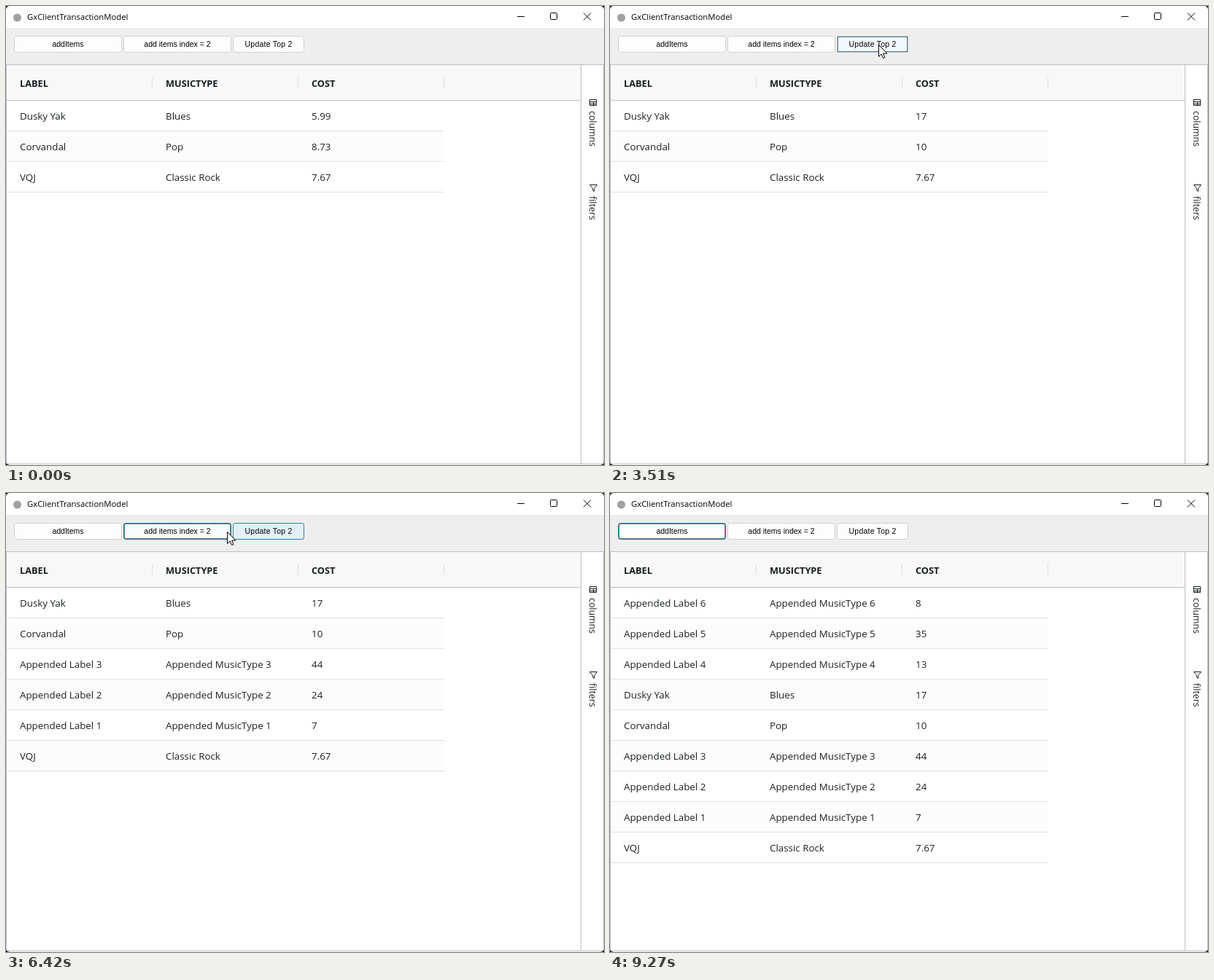
An HTML page that plays this animation: 820x630 px, repeating every 9350 ms.

```html
<!DOCTYPE html>
<html lang="en">
<head>
<meta charset="utf-8">
<title>GxClientTransactionModel</title>
<style>
  html, body { margin: 0; width: 100%; height: 100%; overflow: hidden; background: #18121c; }
  svg { display: block; }
  text { font: 13.35px "Open Sans", "Noto Sans", sans-serif; fill: #1c2123; white-space: pre; }
  .title { font-size: 11.3px; fill: #000; }
  .head text { font-size: 12.75px; font-weight: 700; fill: #181d1f; }
  .side text { font-size: 12.35px; fill: #181d1f; }
  .button text { font: 10.5px "Liberation Sans", Arial, sans-serif; fill: #000; text-anchor: middle; }
  .button rect { fill: #fdfdfd; stroke: #d0d0d0; }
  .button .ring { fill: none; stroke: #0b7a9c; }
  .button .hover { fill: #e0eef8; stroke: #0b7a9c; }
  .button .press { fill: #f4f9fd; stroke: #a9cbdc; }
  .button .dots { fill: none; stroke: #000; stroke-dasharray: 1 1; }
  .line { fill: #babfc7; }
  .icon { fill: none; stroke: #181d1f; }
</style>
</head>
<body>
<svg width="820" height="630" viewBox="0 0 820 630">
  <rect width="820" height="630" rx="5" fill="#fff"/>
  <rect y="30" width="820" height="51" fill="#eee"/>

  <circle cx="15.5" cy="16" r="5.5" fill="#a0a0a0"/>
  <text class="title" x="29" y="19">GxClientTransactionModel</text>
  <g fill="none" stroke="#000">
    <path d="M701 14.5h10M792 9.5l10 10M802 9.5l-10 10"/>
    <rect x="746.5" y="9.5" width="9" height="9" rx="1"/>
  </g>

  <g id="buttons"></g>

  <rect x="1" y="81" width="787" height="48" fill="#f8f8f8"/>
  <g class="head">
    <text x="19" y="110.5">LABEL</text>
    <text x="219" y="110.5">MUSICTYPE</text>
    <text x="419" y="110.5">COST</text>
  </g>
  <path d="M200.5 98v14M400.5 98v14M600.5 98v14" stroke="#d9dce0"/>
  <g id="rows"></g>

  <g class="line">
    <rect y="80" width="820" height="1"/>
    <rect y="129" width="788" height="1"/>
    <rect x="788" y="81" width="1" height="547"/>
    <rect y="80" width="1" height="546"/>
    <rect x="819" y="80" width="1" height="546"/>
    <rect x="2" y="628" width="816" height="1"/>
  </g>

  <g class="side">
    <path class="icon" d="M800.5 128.5h9v8h-9zM800 131.5h10M805.5 131v6M800 134.5h10"/>
    <text transform="translate(800 144) rotate(90)">columns</text>
    <path class="icon" d="M800.5 245.5h10l-4 5v4l-2-1.500v-2.500z"/>
    <text transform="translate(800 261) rotate(90)">filters</text>
  </g>

  <path id="cursor" d="M.5.5v16l3.700-3.500 2.500 5.600 2.300-1-2.400-5.500h5.300z" fill="#fff" stroke="#000"/>
</svg>
<script>
const LOOP = 9350, FADE = 170;
const $ = id => document.getElementById(id);
const clamp = v => Math.min(1, Math.max(0, v));

// Each span is [start, end]; it fades in after start and out after end.
const buttons = [
  { label: "addItems", x: 11, width: 148,
    hover: [[4340, 4760], [6620, 8470]], press: [[6950, 7190]], focus: [6950, LOOP] },
  { label: "add items index = 2", x: 161, width: 148,
    hover: [[2740, 2960], [4050, 4300], [4860, 6130], [6410, 6600]],
    press: [[5030, 5330]], focus: [5030, 6950] },
  { label: "Update Top 2", x: 311, width: 98, spacing: .22,
    hover: [[700, 2740], [2970, 4030], [6270, 6400]],
    press: [[1700, 1920], [3200, 3500]], focus: [1700, 5030] },
];

const path = [
  [80, 440, 640], [870, 377, 47], [2660, 377, 47], [2870, 295, 52], [3090, 368, 53],
  [3900, 368, 53], [4510, 97, 52], [4680, 97, 52], [5000, 197, 56], [6020, 197, 56],
  [6320, 330, 54], [6790, 99, 48], [8430, 99, 48], [8820, 438, 605], [9120, 438, 605],
  [9270, 440, 640],
];

const appended = (n, cost) => [`Appended Label ${n}`, `Appended MusicType ${n}`, cost];
const base = (top, second) => [["Dusky Yak", "Blues", top], ["Corvandal", "Pop", second]];
const last = ["VQJ", "Classic Rock", "7.67"];
const inserted = [...base(17, 10), appended(3, 44), appended(2, 24), appended(1, 7), last];
const tables = [
  [0, [...base("5.99", "8.73"), last]],
  [1950, [...base(20, 38), last]],
  [3440, [...base(17, 10), last]],
  [5310, inserted],
  [7230, [appended(6, 8), appended(5, 35), appended(4, 13), ...inserted]],
];

$("buttons").innerHTML = buttons.map(({ label, x, width, spacing = 0 }) => {
  const box = name => `<rect class="${name}" x=".5" y=".5" width="${width - 1}" height="22" rx="3"/>`;
  return `<g class="button" transform="translate(${x} 41)">
    ${["base", "ring", "hover", "press"].map(box).join("")}
    <rect class="dots" x="1.5" y="1.5" width="${width - 3}" height="20"/>
    <text x="${width / 2}" y="15" letter-spacing="${spacing}">${label}</text></g>`;
}).join("");
buttons.forEach((button, i) => { button.node = $("buttons").children[i]; });

const fade = (t, [start, end], out = FADE) =>
  Math.min(clamp((t - start) / FADE), 1 - clamp((t - end) / out));
const strongest = (t, spans) => Math.max(...spans.map(span => fade(t, span)));

function drawButton({ node, hover, press, focus }, t) {
  const show = (name, opacity) => { node.querySelector("." + name).style.opacity = opacity; };
  show("ring", fade(t, focus, 500));
  show("hover", strongest(t, hover));
  show("press", strongest(t, press));
  show("dots", t >= focus[0] && t < focus[1] ? 1 : 0);
}

function drawCursor(t) {
  const next = path.findIndex(point => point[0] > t);
  $("cursor").style.display = next > 0 ? "" : "none";
  if (next <= 0) return;
  const [t0, x0, y0] = path[next - 1], [t1, x1, y1] = path[next];
  const p = (t - t0) / (t1 - t0), k = p * p * (3 - 2 * p);
  const x = Math.round(x0 + (x1 - x0) * k), y = Math.round(y0 + (y1 - y0) * k);
  $("cursor").setAttribute("transform", `translate(${x} ${y})`);
}

let shown;
function drawRows(t) {
  const table = tables.filter(([start]) => start <= t).pop()[1];
  if (table === shown) return;
  shown = table;
  $("rows").innerHTML = table.map((cells, i) => {
    const y = 130 + 42 * i;
    return `<rect x="1" y="${y}" width="600" height="41" fill="${i % 2 ? "#fcfcfc" : "#fff"}"/>
      <rect x="1" y="${y + 41}" width="600" height="1" fill="#dfe1e4"/>` +
      cells.map((cell, c) => `<text x="${19 + 200 * c}" y="${y + 26}">${cell}</text>`).join("");
  }).join("");
}

function draw(now) {
  const t = now % LOOP;
  buttons.forEach(button => drawButton(button, t));
  drawRows(t);
  drawCursor(t);
}

const began = performance.now();
function tick() {
  draw(performance.now() - began);
  requestAnimationFrame(tick);
}
tick();
</script>
</body>
</html>
```
